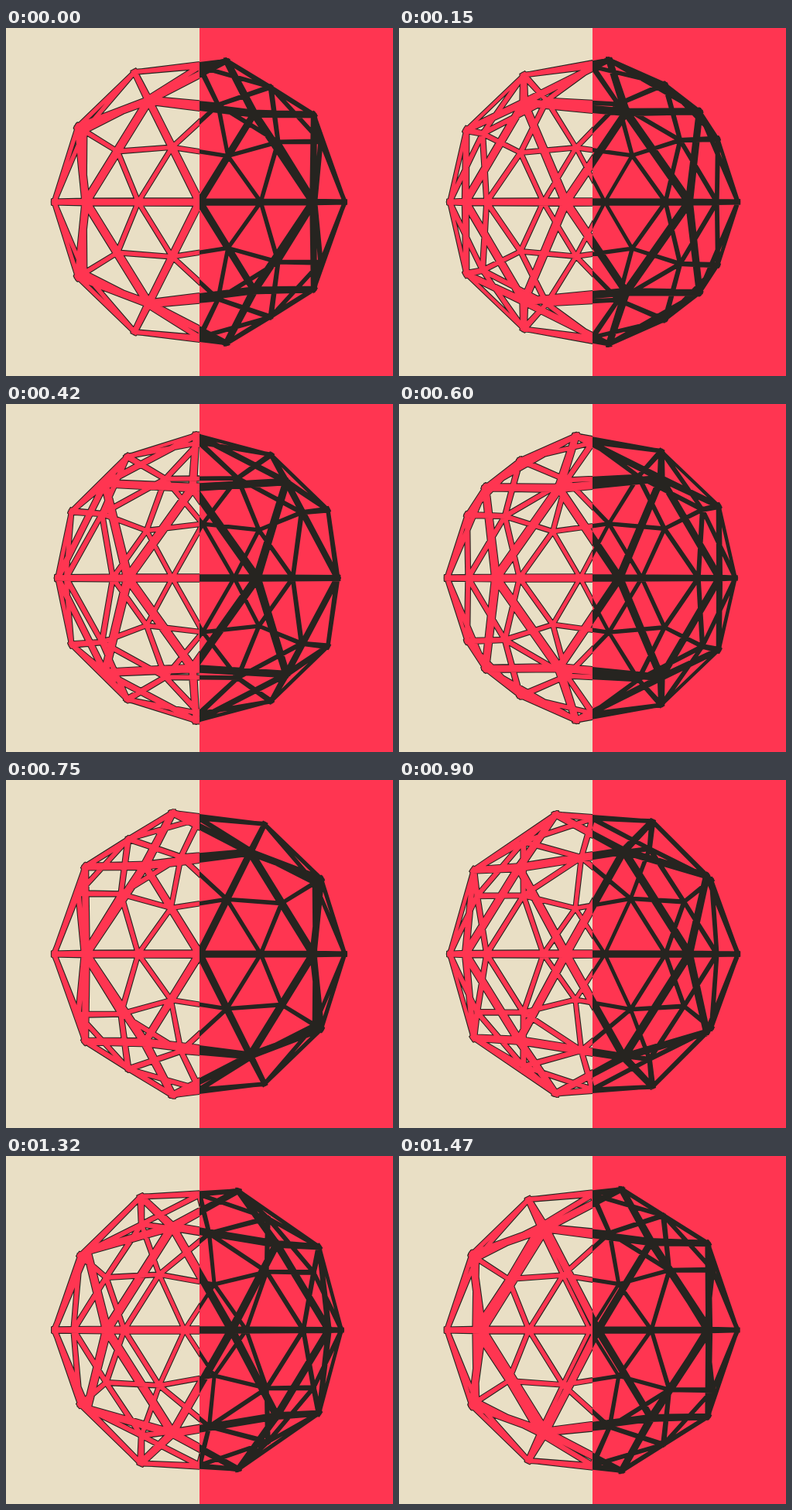
An HTML page with a canvas for the animation above (1.5 s loop, 500 px wide and 450 px high).

```html
<!DOCTYPE html>
<html lang="en">
<head>
<meta charset="utf-8">
<title>Turning geodesic sphere</title>
<style>
  html, body { margin: 0; width: 100%; height: 100%; overflow: hidden; background: #e9dfc5; }
  canvas { display: block; }
</style>
</head>
<body>
<canvas id="stage" width="500" height="450"></canvas>
<script>
const W = 500, H = 450, CX = 250, CY = 225;
const RADIUS = 175, CAMERA = 2.7 * RADIUS;
const WIDTH = 6, DEPTH = 3.5, OVERHANG = 2.5;
const LOOP = 1500, STEP = 30, TURN = 72;
const SAND = '#e9dfc5', RED = '#ff3551', INK = '#262420';

const ctx = document.getElementById('stage').getContext('2d');
const rad = deg => deg * Math.PI / 180;

const add = (p, q, k = 1) => p.map((v, i) => v + q[i] * k);
const unit = p => p.map(v => v / Math.hypot(...p));
const cross = (p, q) => [
  p[1] * q[2] - p[2] * q[1],
  p[2] * q[0] - p[0] * q[2],
  p[0] * q[1] - p[1] * q[0]
];

// Angles from the pole for each ring of the two-frequency dome
const HUB = rad(63.435), RIB = HUB / 2, MID = rad(58.283), EQUATOR = Math.PI / 2;

function point(polar, azimuth) {
  const a = rad(azimuth), r = RADIUS * Math.sin(polar);
  return [r * Math.sin(a), RADIUS * Math.cos(polar), r * Math.cos(a)];
}

const pole = point(0, 0);
const rib = a => point(RIB, a), hub = a => point(HUB, a);
const mid = a => point(MID, a), rim = a => point(EQUATOR, a);

// Edges of the upper dome, one fifth at a time
const edges = [];
for (let k = 0; k < 5; k++) {
  const a = 18 + k * 72;
  edges.push(
    [pole, rib(a)], [rib(a), rib(a + 72)], [rib(a), hub(a)],
    [rim(a - 18), rim(a + 18)], [rim(a + 18), rim(a + 54)]
  );
  for (const s of [-1, 1]) {
    edges.push(
      [rib(a), mid(a + 36 * s)], [hub(a), mid(a + 36 * s)],
      [hub(a), rim(a + 18 * s)], [mid(a + 36), rim(a + 36 + 18 * s)]
    );
  }
}

// Faces of a flat bar lying along the sphere
function barFaces([from, to]) {
  const along = unit(add(to, from, -1));
  const out = unit(add(from, to));
  const side = cross(along, out);
  const ring = centre => [[1, 1], [1, -1], [-1, -1], [-1, 1]].map(([s, o]) =>
    add(add(centre, side, s * WIDTH / 2), out, o * DEPTH / 2));
  const near = ring(add(from, along, -OVERHANG));
  const far = ring(add(to, along, OVERHANG));
  const walls = near.map((p, i) => {
    const j = (i + 1) % 4;
    return [p, near[j], far[j], far[i]];
  });
  return [near, far, ...walls];
}

const upper = edges.flatMap(barFaces);
const lower = upper.map(face => face.map(([x, y, z]) => [x, -y, z]));
const faces = [...upper, ...lower];

function buildSphere(turn) {
  const c = Math.cos(turn), s = Math.sin(turn);
  const project = ([x, y, z]) => {
    const scale = CAMERA / (CAMERA - (z * c + x * s));
    return [CX + (x * c - z * s) * scale, CY - y * scale];
  };
  const path = new Path2D();
  for (const face of faces) {
    const pts = face.map(project);
    // Same winding for every face, so overlaps fill as one shape
    const area = pts.reduce((sum, [x, y], i) => {
      const [u, v] = pts[(i + 1) % 4];
      return sum + x * v - u * y;
    }, 0);
    if (area < 0) pts.reverse();
    path.moveTo(...pts[0]);
    for (const p of pts.slice(1)) path.lineTo(...p);
    path.closePath();
  }
  return path;
}

function drawHalf(path, x, back, fill, outline) {
  ctx.save();
  ctx.beginPath();
  ctx.rect(x, 0, W / 2, H);
  ctx.clip();
  ctx.fillStyle = back;
  ctx.fillRect(x, 0, W / 2, H);
  if (outline) {
    ctx.strokeStyle = outline;
    ctx.lineWidth = 2.2;
    ctx.lineJoin = 'round';
    ctx.stroke(path);
  }
  ctx.fillStyle = fill;
  ctx.fill(path);
  ctx.restore();
}

const start = performance.now();

function draw() {
  const elapsed = performance.now() - start;
  const time = Math.floor((elapsed + 4) / STEP) * STEP % LOOP;
  const sphere = buildSphere(rad(TURN * time / LOOP));
  drawHalf(sphere, 0, SAND, RED, INK);
  drawHalf(sphere, W / 2, RED, INK);
  requestAnimationFrame(draw);
}
draw();
</script>
</body>
</html>
```
